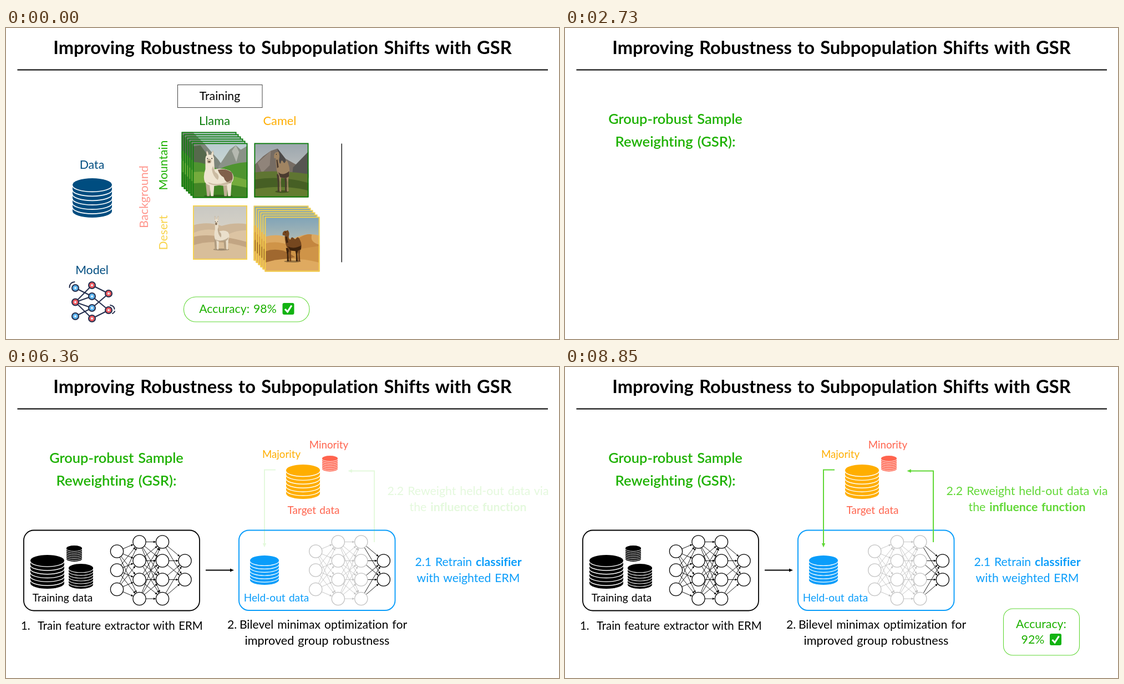
Write an HTML page that moves like this. It is 997 px wide and 561 px high and loops after 9.03 s.

```html
<!DOCTYPE html>
<html lang="en">
<head>
<meta charset="utf-8">
<title>Improving Robustness to Subpopulation Shifts with GSR</title>
<style>
  html, body { margin: 0; width: 100%; height: 100%; overflow: hidden; background: #fff; }
  svg { display: block; width: 100vw; height: 100vh; }
  text { font-family: Lato, "Open Sans", sans-serif; font-variant-ligatures: none; word-spacing: .07em; white-space: pre; }
</style>
</head>
<body>
<svg id="stage" viewBox="0 0 997 561"></svg>
<script>
const LOOP = 9030, TICK = 30;
const GREEN = '#1db100', LIME = '#61d836', BLUE = '#0a9dfa', NAVY = '#004d80',
      RED = '#ee220c', CORAL = '#ff644e', GOLD = '#ffae00', FOREST = '#0b7d0b', SAND = '#f8d34a';

// ---------- basic shapes ----------
const text = (x, y, s, fill = '#000', size = 21.3, o = {}) =>
  `<text x="${x}" y="${y}" fill="${fill}" font-size="${size}" font-weight="${o.weight || 400}"
    text-anchor="${o.anchor || 'middle'}" ${o.turn ? `transform="rotate(-90 ${x} ${y})"` : ''}>${s}</text>`;
const bold = s => `<tspan font-weight="700">${s}</tspan>`;
const path = (d, fill = 'none', stroke = 'none', w = 1, extra = '') =>
  `<path d="${d}" fill="${fill}" stroke="${stroke}" stroke-width="${w}" ${extra}/>`;
const rect = (x, y, w, h, rx, stroke, sw, fill = 'none') =>
  `<rect x="${x}" y="${y}" width="${w}" height="${h}" rx="${rx}" stroke="${stroke}" stroke-width="${sw}" fill="${fill}"/>`;
const dot = (x, y, r, fill, stroke = 'none', w = 1) =>
  `<circle cx="${x}" cy="${y}" r="${r}" fill="${fill}" stroke="${stroke}" stroke-width="${w}"/>`;
const oval = (x, y, rx, ry, fill) => `<ellipse cx="${x}" cy="${y}" rx="${rx}" ry="${ry}" fill="${fill}"/>`;

// Polyline through [x, y] points, ending in a filled head
function arrow(pts, color, w, head) {
  const [bx, by] = pts[pts.length - 1], [ax, ay] = pts[pts.length - 2];
  const len = Math.hypot(bx - ax, by - ay), ux = (bx - ax) / len, uy = (by - ay) / len;
  const cx = bx - ux * head, cy = by - uy * head, k = head * .42;
  const line = [...pts.slice(0, -1), [cx, cy]].map(p => p.map(v => v.toFixed(1))).join('L');
  return path('M' + line, 'none', color, w) +
    path(`M${bx} ${by}L${cx - uy * k} ${cy + ux * k}L${cx + uy * k} ${cy - ux * k}Z`, color);
}

// Stacked-disk database icon
function cylinder(x, y, w, h, fill) {
  const rx = w / 2, ry = h * .165, top = y + ry, step = (h - 2 * ry) / 6;
  let s = path(`M${x} ${top}a${rx} ${ry} 0 0 1 ${w} 0V${y + h - ry}a${rx} ${ry} 0 0 1 ${-w} 0Z`, fill);
  for (let i = 0; i < 6; i++)
    s += path(`M${x - .5} ${top + i * step + 1}a${rx + .5} ${ry} 0 0 0 ${w + 1} 0`, 'none', '#fff', Math.max(.9, w / 42));
  return s;
}

const check = (x, y) => rect(x, y, 21, 21, 3, 'none', 0, '#12b312') +
  path(`M${x + 4.5} ${y + 11}l4.5 5l7.5 -11.5`, 'none', '#fff', 3.2);
const cross = (x, y) => path(`M${x + 2} ${y + 2}l17 17m0 -17l-17 17`, 'none', RED, 4.5);

function badge(x, color, edge, value, mark) {
  return rect(x + .5, 485, 226.5, 45, 22, edge, 1.1) +
    text(x + 98, 514, `Accuracy: ${value}`, color) + mark(x + 178.5, 496);
}

// ---------- network diagrams ----------
function network(dx, faint) {
  const cols = [[200, [332.5, 366.5, 401]], [240.5, [315.5, 349.5, 383.5, 418]],
                [282, [315.5, 349.5, 383.5, 418]], [322.5, [349.5, 383.5]]];
  const R = 11.6;
  let edges = '', nodes = '';
  cols.forEach(([x, ys], i) => {
    const tone = faint && i < 3 ? '#c2c2c2' : '#000';
    for (const y of ys) {
      nodes += dot(x + dx, y, R, '#fff', tone, 1.3);
      if (i === 0) continue;
      const [px, pys] = cols[i - 1];
      for (const py of pys) {
        const d = Math.hypot(x - px, y - py), ux = (x - px) / d * R, uy = (y - py) / d * R;
        edges += arrow([[px + dx + ux, py + uy], [x + dx - ux, y - uy]], tone, .9, 4.5);
      }
    }
  });
  return edges + nodes;
}

function modelIcon() {
  const ink = '#26304f', pink = '#ef5a5f', sky = '#5db4ee';
  const links = [[125, 469, 155, 484], [125, 494.5, 155, 464], [125, 494.5, 155, 484], [125, 494.5, 155, 505],
    [125, 494.5, 155, 524], [125, 520, 155, 505], [155, 464, 185, 479], [155, 484, 185, 509],
    [155, 505, 185, 479], [155, 524, 185, 509]];
  const node = c => ([x, y]) => dot(x, y, 6, c, ink, 2.1) + dot(x, y, 2, '#e8f2fa');
  return links.map(([a, b, c, d]) => path(`M${a} ${b}L${c} ${d}`, 'none', ink, 2)).join('') +
    [[125, 494.5], [155, 464], [155, 524], [185, 479], [185, 509]].map(node(pink)).join('') +
    [[125, 469], [125, 520], [155, 484], [155, 505]].map(node(sky)).join('') +
    path('M114.5 468q0 -9 9 -10M196 511q-1 3 -4 4M188 500q7 1 7.500 7', 'none', ink, 2, 'stroke-linecap="round"');
}

// ---------- picture tiles, 98 x 98 ----------
const place = (x, y, sx, sy, s) => `<g transform="translate(${x} ${y}) scale(${sx} ${sy})">${s}</g>`;

const SLIM = 'M9 12Q8 3 14 3Q21 3 20 13L21 35Q40 30 53 36Q60 43 56 53Q45 59 30 58Q12 61 8 52Q5 42 9 30Z';
const FLEECY = 'M6 12Q5 3 14 3Q23 3 22 13L23 30Q40 27 52 33Q61 40 57 52Q50 63 32 60Q12 64 5 54Q1 44 6 30Z';

const llama = (body, coat, shade, patch) =>
  oval(30, 80, 27, 2.5, '#0004') +
  [[11, shade], [43, shade], [18, coat], [50, coat]].map(([x, c]) =>
    path(`M${x - 5} 50H${x + 5}L${x + 3} 80H${x - 2}Z`, c)).join('') +
  path('M9 5Q7 -3 9 -4Q12 -1 12 6ZM16 6Q17 -1 20 -4Q22 -2 20 6Z', coat, shade, .7) +
  path(body, coat) +
  (patch ? path('M29 31Q46 28 55 36Q60 48 52 56Q43 55 40 45Q33 42 29 31Z', patch) : '') +
  path('M10 54Q32 63 56 49Q52 61 32 60Q16 61 10 54ZM20 24L24 35Q34 41 29 50Q20 44 18 30Z', shade, 'none', 1, 'opacity=".75"') +
  oval(13, 15, 4, 4, shade) + oval(13, 16, 2, 1.3, '#54443a') + dot(10, 10, 1, '#222') + dot(18, 10, 1, '#222');

const camel = (coat, shade) =>
  oval(22, 80, 18, 2.5, '#0005') +
  [[12, shade], [31, shade], [17, coat], [36, coat]].map(([x, c]) =>
    path(`M${x - 4} 46h7l-1.500 16l1 18h-4l0 -18Z`, c)).join('') +
  path('M1 9Q3 2 9 3L12 1L14 5Q16 10 14 17Q14 25 18 25Q20 15 25 22Q28 26 30 22Q34 15 38 26Q43 36 40 50Q30 56 17 52Q8 45 7 32Q5 20 6 15L1 14Z', coat) +
  path('M12 42Q24 50 40 40L40 50Q30 56 17 52ZM7 18L10 17L13 32L9 34Z', shade) +
  dot(7, 7, .9, '#111');

const fade = (id, a, b) => `<linearGradient id="${id}" x2="0" y2="1"><stop stop-color="${a}"/><stop offset="1" stop-color="${b}"/></linearGradient>`;
const back = id => rect(0, 0, 98, 98, 0, 'none', 0, `url(#${id})`);
const hills = (...list) => list.map(([d, c]) => path(d, c)).join('');

const tiles = {
  valley: back('mist') + hills(
    ['M0 0H20L32 14L46 30L58 48H0Z', '#7d857a'], ['M0 6L14 4L27 22L40 46H0Z', '#56694c'],
    ['M46 42L66 12L77 4L86 12L98 5V60H46Z', '#8a9287'], ['M70 14L77 4L83 16L78 34Z', '#b5b9b0'],
    ['M0 34Q20 34 46 47Q70 36 98 34V98H0Z', '#4f9430'], ['M0 52Q34 48 98 66V98H0Z', '#74ab3c'],
    ['M0 72Q46 68 98 80V98H0Z', '#438526']) +
    place(17, 18, .96, .96, llama(FLEECY, '#eee4d0', '#bfae93', '#80604a')),
  crag: back('dusk') + hills(
    ['M0 40L16 24L30 14L42 10L56 28L74 38L98 46V64H0Z', '#766c63'], ['M42 10L56 28L62 56L46 46Z', '#4d4a49'],
    ['M6 36L30 14L28 40L14 54Z', '#90847a'], ['M70 44L98 15V62H68Z', '#565552'],
    ['M0 53Q40 48 98 56V98H0Z', '#5f7532'], ['M0 66Q48 58 98 72V98H0Z', '#465f24'], ['M0 83Q56 74 98 86V98H0Z', '#647c30']) +
    place(35, 14, .7, .92, camel('#a08462', '#4a3a2e')),
  pale: back('haze') + hills(
    ['M0 36Q26 28 52 37Q76 30 98 34V98H0Z', '#cdb698'], ['M0 50Q30 36 64 52Q80 44 98 45V98H0Z', '#dcc4a3'],
    ['M0 57Q30 48 98 66V98H0Z', '#c2a583'], ['M0 72Q42 58 98 76V98H0Z', '#d8be9a']) +
    place(35, 22, .53, .72, llama(SLIM, '#eadfcb', '#b09c80')),
  dunes: back('warm') + hills(
    ['M0 36Q24 28 48 40Q78 26 98 34V98H0Z', '#dca962'], ['M50 46Q72 28 84 32Q80 46 98 50V64H50Z', '#c4863f'],
    ['M0 48Q28 40 60 58L98 52V98H0Z', '#cf9448'], ['M0 62Q28 52 54 72L0 84Z', '#a0682f'],
    ['M0 82Q46 68 98 82V98H0Z', '#dfaa60']) +
    place(31, 23, .84, .71, camel('#75471f', '#3d230d')),
  peaks: back('slate') + hills(
    ['M0 40L16 26L32 8L44 26L56 22L66 10L80 30L98 40V66H0Z', '#6b7076'], ['M32 8L42 24L36 42L28 30L20 36Z', '#c9ced2'],
    ['M66 10L76 26L68 40L62 28Z', '#b4babf'], ['M44 28L54 52L32 54Z', '#4a5257'],
    ['M0 50Q46 44 98 52V98H0Z', '#3f5c29'], ['M0 63Q50 54 98 66V98H0Z', '#5d7d2f'], ['M0 80Q48 68 98 84V98H0Z', '#355719']) +
    place(38, 22, .38, .92, llama(SLIM, '#eae5db', '#aaa296')),
  ridge: back('azure') + hills(
    ['M0 34Q34 20 60 32Q82 22 98 27V98H0Z', '#bfa27b'], ['M0 46Q34 34 64 48L98 40V98H0Z', '#d9ba8e'],
    ['M0 60Q20 48 42 66L0 82Z', '#7f6d60'], ['M62 58Q84 50 98 54V82Q80 70 62 58Z', '#927a66'],
    ['M0 80Q52 64 98 82V98H0Z', '#cdac80']) +
    place(25, 12, 1.01, 1.04, llama(FLEECY, '#d9c7ab', '#9c8466'))
};

// Picture with n copies peeking out behind it
function stack(kind, x, y, size, edge, n = 0, gap = 4) {
  let s = '';
  for (let i = n; i >= 0; i--)
    s += place(x - i * gap, y - i * gap, size / 98, size / 98,
      `<use href="#${kind}"/>` + rect(.9, .9, 96.2, 96.2, 0, edge, 1.8));
  return s;
}

// ---------- scenes ----------
const wipes = [], group = (id, s) => `<g id="${id}">${s}</g>`;
function wipe(at, x0, x1, s) {
  const id = 'w' + wipes.length;
  wipes.push({ id, at, x0, x1 });
  return `<linearGradient id="${id}" gradientUnits="userSpaceOnUse" y1="0" y2="0"><stop stop-color="#fff"/><stop offset="1" stop-color="#000"/></linearGradient>
    <mask id="m${id}" maskUnits="userSpaceOnUse" x="0" y="0" width="997" height="561"><rect width="997" height="561" fill="url(#${id})"/></mask>
    <g mask="url(#m${id})">${s}</g>`;
}

const defs = '<defs>' + fade('mist', '#b9cbd0', '#e2e6d8') + fade('dusk', '#9ba6ae', '#d9d4ca') +
  fade('haze', '#c8c8c3', '#e8ddca') + fade('warm', '#7fa3b8', '#ecd9b0') + fade('slate', '#93a5b8', '#d5dade') +
  fade('azure', '#6f9ac6', '#d4dbe0') +
  Object.entries(tiles).map(([k, s]) => `<symbol id="${k}" width="98" height="98" viewBox="0 0 98 98">${s}</symbol>`).join('') + '</defs>';

const header = text(498.5, 47, 'Improving Robustness to Subpopulation Shifts with GSR', '#000', 32.7, { weight: 700 }) +
  path('M20.500 75.500H977', 'none', '#000', 1.8);

const problem =
  rect(309.5, 102.5, 152.5, 41, 0, '#444', 1) + text(385.5, 130, 'Training') +
  text(376, 175, 'Llama', FOREST, 21.8) + text(493.5, 175, 'Camel', GOLD, 21.8) +
  text(155, 253.5, 'Data', NAVY) + cylinder(120, 271, 71, 71, NAVY) +
  text(155, 444, 'Model', NAVY) + modelIcon() +
  text(255.5, 304.5, 'Background', '#ff968d', 21.6, { turn: 1 }) +
  text(290.5, 247.5, 'Mountain', GREEN, 21.2, { turn: 1 }) +
  text(290.5, 369, 'Desert', SAND, 21.2, { turn: 1 }) +
  stack('valley', 336.5, 207.5, 99, FOREST, 5) + stack('crag', 447.5, 207.5, 98, FOREST) +
  stack('pale', 337, 320, 98, SAND) + stack('dunes', 466.5, 340.5, 99, SAND, 5) +
  path('M605.200 208.500V422.500', 'none', '#000', 1.3) + badge(320, GREEN, LIME, '98%', check) +
  wipe(210, 497, 871,
    arrow([[497, 123.5], [665, 123.5]], '#000', 1.3, 6) +
    text(580.5, 114, 'Subpopulation', RED, 21.5, { weight: 700 }) + text(580.5, 146, 'Shift', RED, 21.2, { weight: 700 }) +
    path('M716 102.500H871L828 143.500H673.500Z', 'none', '#444', 1) + text(772.5, 130, 'Deployment')) +
  wipe(840, 713, 833,
    text(771.5, 175, 'Llama', FOREST, 21.8) + stack('peaks', 722.5, 208.5, 98, FOREST) +
    stack('ridge', 729.5, 337.5, 103, SAND, 4, 4.1)) +
  group('drop', badge(658, RED, CORAL, '61%', cross));

const method =
  text(199, 173, 'Group-robust Sample', GREEN, 25.4, { weight: 600 }) +
  text(199, 214, 'Reweighting (GSR):', GREEN, 25.6, { weight: 600 }) +
  wipe(2910, 28, 354,
    rect(32, 294.5, 317, 145, 18, '#000', 1.8) +
    cylinder(44, 339, 61, 61, '#000') + cylinder(109, 322, 28, 29, '#000') + cylinder(113, 355, 44, 45, '#000') +
    network(0, false) + text(102, 423, 'Training data', '#000', 19.1) +
    text(27, 474, '1.', '#000', 20.4, { anchor: 'start' }) +
    text(57, 474, 'Train feature extractor with ERM', '#000', 20.4, { anchor: 'start' })) +
  wipe(3540, 360, 724,
    arrow([[360, 366.5], [411, 366.5]], '#000', 1.8, 7) + cylinder(440, 340, 52, 53, BLUE) +
    text(487.5, 423, 'Held-out data', BLUE, 19.1) + network(358.3, true) +
    text(399, 472, '2.', '#000', 21.3, { anchor: 'start' }) +
    text(572, 472, 'Bilevel minimax optimization for', '#000', 21.2) +
    text(561, 501, 'improved group robustness', '#000', 21.6)) +
  group('inner',
    rect(420, 294.5, 281.5, 144.5, 18, BLUE, 1.9) +
    text(833.5, 359, '2.1 Retrain ' + bold('classifier'), BLUE, 21.2) + text(833.5, 388, 'with weighted ERM', BLUE, 21.2)) +
  wipe(5010, 462, 617,
    text(496.5, 164, 'Majority', GOLD, 18.7) + text(582, 147, 'Minority', CORAL, 18.7) +
    cylinder(505, 176, 61, 62, GOLD) + cylinder(570, 160, 28, 28.5, CORAL) + text(554.5, 265, 'Target data', CORAL, 19)) +
  wipe(5610, 462, 976, group('outer',
    arrow([[486, 185.5], [466, 185.5], [466, 325.5]], LIME, 2, 7.5) +
    arrow([[664, 316], [664, 187.5], [616.5, 187.5]], LIME, 2, 7.5) +
    text(833, 231, '2.2 Reweight held-out data via', LIME, 21.3) +
    text(833, 260, 'the ' + bold('influence function'), LIME, 21.3))) +
  group('gain',
    rect(790.5, 436, 137, 84, 17, LIME, 1.1) + text(858.5, 471, 'Accuracy:', GREEN) +
    text(843.5, 499, '92%', GREEN) + check(874, 481));

const $ = id => document.getElementById(id);
$('stage').innerHTML = defs + header + group('problem', problem) + group('method', method);

// ---------- timeline ----------
const WIPE = 450, SOFT = .14;
const blinks = { drop: [[1620, 930]], inner: [[4320, 480], [6840, 480]], outer: [[6210, 480], [7470, 480]] };
const shows = { problem: [0, 2730], drop: [1470, 2730], method: [2730, LOOP], inner: [4170, LOOP], gain: [8850, LOOP] };
const unit = v => Math.min(1, Math.max(0, v));

function draw(t) {
  for (const [id, [from, to]] of Object.entries(shows))
    $(id).style.display = t >= from && t < to ? '' : 'none';
  for (const { id, at, x0, x1 } of wipes) {
    const soft = (x1 - x0) * SOFT, front = x0 - 1 + unit((t - at + TICK) / WIPE) * (x1 - x0 + soft + 3);
    $(id).setAttribute('x1', front - soft);
    $(id).setAttribute('x2', front);
  }
  for (const [id, runs] of Object.entries(blinks)) {
    const dip = runs.reduce((m, [at, d]) => Math.max(m, Math.sin(Math.PI * unit((t - at) / d))), 0);
    $(id).style.opacity = 1 - dip;
  }
}

const start = performance.now();
function tick() {
  const t = (performance.now() - start) % LOOP;
  draw(Math.floor(t / TICK) * TICK);
  requestAnimationFrame(tick);
}
tick();
</script>
</body>
</html>
```
